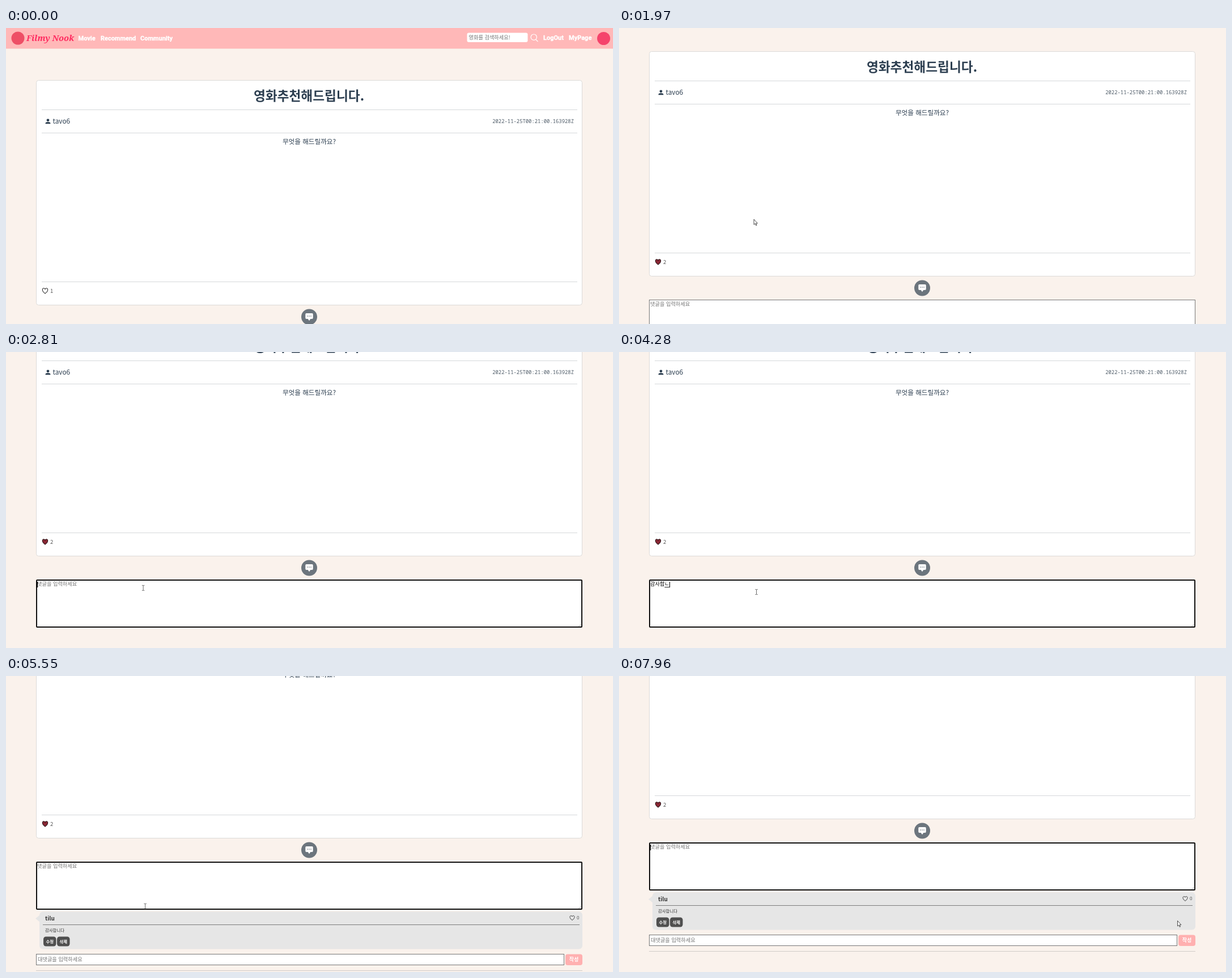
An HTML page that plays this animation: 1071 px wide and 523 px high, repeating every 8 s.

```html
<!DOCTYPE html>
<html lang="ko">
<head>
<meta charset="utf-8">
<title>영화 게시판</title>
<style>
  html, body { margin: 0; width: 100%; height: 100%; overflow: hidden; background: #faf2ec; }
  svg { display: block; width: 100vw; height: 100vh; }
  text { font-family: "Noto Sans CJK KR", "Noto Sans CJK", "Noto Sans", sans-serif; fill: #2c3e50; white-space: pre; }
  .nav text { font: 700 11px Roboto, sans-serif; fill: #fff; stroke: #fff; stroke-width: .35px; }
  .nav .brand { font: italic 700 14.6px "Noto Serif", serif; fill: #ff2a5f; stroke: none; }
  .nav .hint, .hint { font-size: 9.2px; font-weight: 400; fill: #757575; stroke: none; }
  .nav .hint { font-family: "Noto Sans CJK KR", "Noto Sans CJK", sans-serif; }
  .title { font-size: 22.7px; font-weight: 700; text-anchor: middle; }
  .date { font: 8.9px "Noto Sans Mono", monospace; fill: #4c5966; text-anchor: end; }
  .small { font-size: 9.5px; fill: #555; }
  .btn { font-weight: 700; fill: #fff; text-anchor: middle; }
  .rule { stroke: #d5d8da; }
  .outline { fill: none; stroke: #333; stroke-width: 1.1; }
  #box { x: 53.5px; y: 531.5px; width: 963px; height: 84px; fill: #fff; stroke: #767676; }
  #box.focused { x: 54px; y: 532px; width: 962px; height: 83px; rx: 1px; stroke: #101010; stroke-width: 2px; }
</style>
</head>
<body>
<svg viewBox="0 0 1071 523" preserveAspectRatio="none">
  <defs>
    <path id="heart" d="M0 4.8C-6.6 .5-5-4.4-2.5-4.4-1.2-4.4-.4-3.6 0-2.7 .4-3.6 1.2-4.4 2.5-4.4 5-4.4 6.6 .5 0 4.8Z"/>
  </defs>
  <rect width="1071" height="523" fill="#faf2ec"/>
  <g id="page">
    <g class="nav">
      <rect width="1071" height="36.5" fill="#ffb8b8"/>
      <circle cx="21" cy="18" r="11.5" fill="#ee4f66"/>
      <text class="brand" x="36" y="22.5">Filmy Nook</text>
      <text x="127.5" y="21.5">Movie</text>
      <text x="167" y="21.5">Recommend</text>
      <text x="237" y="21.5">Community</text>
      <rect x="813.5" y="8.5" width="107" height="16.5" rx="3" fill="#fff"/>
      <text class="hint" x="816.5" y="20.2">영화를 검색하세요!</text>
      <path d="M935 20.5L938.5 24M936.5 16.2a5.2 5.2 0 1 1-10.4 0a5.2 5.2 0 1 1 10.4 0" fill="none" stroke="#fff" stroke-width="1.2"/>
      <text x="948" y="20.5">LogOut</text>
      <text x="993" y="20.5">MyPage</text>
      <circle cx="1054.5" cy="18.5" r="11.5" fill="#f5436b"/>
    </g>

    <rect x="53.5" y="92.5" width="963" height="397" rx="4" fill="#fff" stroke="#dcdad8"/>
    <text class="title" x="534.5" y="127.5">영화추천해드립니다.</text>
    <path class="rule" d="M63 144.5H1008M63 185.5H1008M63 448.5H1008"/>
    <g fill="#2c3e50">
      <circle cx="74" cy="162.8" r="2.4"/>
      <path d="M69.6 169.3V168C69.6 165.3 78.4 165.3 78.4 168V169.3Z"/>
    </g>
    <text x="82.5" y="169" font-size="11.8">tavo6</text>
    <text class="date" x="1002" y="167.5">2022-11-25T00:21:00.163928Z</text>
    <text x="535" y="205.3" font-size="11.6" text-anchor="middle">무엇을 해드릴까요?</text>
    <use id="like" href="#heart" x="69" y="464.2" stroke-width="1.1"/>
    <text id="likes" class="small" x="78" y="467.7">1</text>

    <circle cx="535" cy="510.5" r="14" fill="#6c757d"/>
    <path d="M530 504H540Q541.7 504 541.7 505.7V512.3Q541.7 514 540 514H537.3L535 517.2L532.7 514H530Q528.3 514 528.3 512.3V505.7Q528.3 504 530 504Z" fill="#fff"/>
    <path d="M532 509H532.01M535 509H535.01M538 509H538.01" stroke="#6c757d" stroke-width="1.7" stroke-linecap="round"/>

    <rect id="box"/>
    <path d="M1010.5 614L1015.5 609M1013.5 614L1015.5 612" stroke="#888" stroke-width=".7"/>
    <text id="hint" class="hint" x="55" y="542.4">댓글을 입력하세요</text>
    <text id="typed" x="55" y="542.4" font-size="9.2" style="fill:#000"></text>
    <path id="compose" stroke="#222"/>
    <path id="caret" stroke="#000"/>

    <g id="reply">
      <path d="M59.5 625.5L52 631.5L59.5 637.5Z" fill="#e6e6e6"/>
      <rect x="59" y="619.5" width="958" height="66" rx="6" fill="#e6e6e6"/>
      <text x="69" y="635.3" font-size="10" font-weight="700" style="fill:#333">tilu</text>
      <use href="#heart" class="outline" transform="translate(999 630.3) scale(.86)"/>
      <text x="1007" y="633" font-size="8" style="fill:#555">0</text>
      <path d="M65 642.5H1012" stroke="#7c7c7c"/>
      <text x="69" y="655" font-size="7.4" style="fill:#333">감사합니다</text>
      <rect x="66" y="663.5" width="22.5" height="17" rx="4.5" fill="#4f4f4f"/>
      <rect x="90" y="663.5" width="22.5" height="17" rx="4.5" fill="#4f4f4f"/>
      <text class="btn" x="77.2" y="674.6" font-size="7.4">수정</text>
      <text class="btn" x="101.2" y="674.6" font-size="7.4">삭제</text>
      <rect x="53.5" y="694.5" width="931" height="19" fill="#fff" stroke="#767676"/>
      <text class="hint" x="56" y="707.2">대댓글을 입력하세요</text>
      <rect x="987" y="694.5" width="30" height="19.5" rx="4" fill="#ffb0b0"/>
      <text class="btn" x="1002" y="707.3" font-size="9">작성</text>
      <path d="M53 723.5H1017" stroke="#d0cbc8"/>
    </g>
  </g>

  <g id="cursor" fill="#fff" stroke="#222" stroke-width=".8">
    <path data-kind="arrow" d="M0 0V9.4L2.2 7.5L3.7 10.9L5.1 10.3L3.7 7.1H6.4Z"/>
    <path data-kind="beam" fill="none" stroke="#444" d="M-2.2-4.5H-.6L0-4L.6-4.5H2.2M0-4V4M-2.2 4.5H-.6L0 4L.6 4.5H2.2"/>
    <path data-kind="hand" d="M-1 0Q0-1 1 0V4.5L5 5.4Q6 5.8 5.8 7L5 11.5H-1L-4 7.5Q-4 6-2.6 6.4L-1 7.5Z"/>
  </g>
</svg>
<script>
const LOOP = 8000;
const $ = id => document.getElementById(id);
const show = (el, on) => el.setAttribute("visibility", on ? "visible" : "hidden");

// Rows: time, value(s)
const scrollPath = [[1880, 0], [1950, 35], [2010, 80], [2070, 115], [2130, 115], [2140, 129],
  [5390, 129], [5420, 136], [5465, 136], [5500, 165], [5560, 210], [5640, 237]];
const mousePath = [[100, 876, 179], [400, 480, 330], [700, 25, 430], [840, 31, 400],
  [920, 36, 408], [1190, 67.5, 470], [1710, 67.5, 470], [1900, 238, 338], [2380, 238, 338],
  [2850, 242.5, 424], [5260, 242.5, 424], [5400, 245, 409.5], [5640, 246, 405],
  [5980, 841, 446], [6100, 841, 446], [6520, 456, 435], [6870, 79, 437],
  [7340, 79, 437], [7960, 985.5, 432.5]];
const typing = "ㄱ 가 감 감ㅅ 감사 감샇 감사하 감사합 감사합ㄴ 감사합니 감사합닏 감사합니다".split(" ");

const TYPE_START = 3690, TYPE_STEP = 71.8, SENT = 4700, POSTED = 4750;
const LIKED = 1410, FOCUSED = 2700;

function at(path, t) {
  const i = path.findIndex(row => row[0] > t);
  if (i < 0) return path[path.length - 1].slice(1);
  if (i === 0) return path[0].slice(1);
  const a = path[i - 1], b = path[i], k = (t - a[0]) / (b[0] - a[0]);
  return a.slice(1).map((v, j) => v + (b[j + 1] - v) * k);
}

function typedText(t) {
  if (t < TYPE_START || t >= SENT) return "";
  return typing[Math.min(typing.length - 1, Math.floor((t - TYPE_START) / TYPE_STEP))];
}

function caretOn(t) {
  if (t < FOCUSED) return false;
  if (t >= TYPE_START && t < POSTED) return true;
  return Math.floor((t - (t < TYPE_START ? FOCUSED : POSTED)) / 500) % 2 === 0;
}

function cursorKind(x, y, scroll) {
  const py = y + scroll;
  if (x > 53 && x < 1017 && py > 531 && py < 616 && scroll > 0) return "beam";
  if (x > 66 && x < 88 && py > 663 && py < 681) return "hand";
  return "arrow";
}

function drawLike(t) {
  const liked = t >= LIKED;
  $("like").setAttribute("fill", !liked ? "none" : t < 1900 ? "#e3141c" : "#8a2734");
  $("like").setAttribute("stroke", liked ? "#2b1418" : "#333");
  $("likes").textContent = liked ? "2" : "1";
}

function drawEditor(t) {
  const text = typedText(t);
  $("box").classList.toggle("focused", t >= FOCUSED);
  $("typed").textContent = text;
  show($("hint"), !text);
  show($("compose"), text);
  show($("caret"), caretOn(t));
  const end = 55 + (text ? $("typed").getComputedTextLength() : 0);
  $("compose").setAttribute("d", `M${end - 8.4} 544.5H${end}`);
  $("caret").setAttribute("d", `M${Math.round(end) + .5} 535V545`);
}

function drawCursor(t, scroll) {
  const [x, y] = at(mousePath, t), kind = cursorKind(x, y, scroll);
  $("cursor").setAttribute("transform", `translate(${x} ${y})`);
  for (const shape of $("cursor").children) show(shape, t >= 100 && shape.dataset.kind === kind);
}

const start = performance.now();
function frame() {
  const t = (performance.now() - start) % LOOP;
  const [scroll] = at(scrollPath, t);
  $("page").setAttribute("transform", `translate(0 ${-Math.round(scroll)})`);
  drawLike(t);
  drawEditor(t);
  show($("reply"), t >= POSTED);
  drawCursor(t, scroll);
  requestAnimationFrame(frame);
}
frame();
</script>
</body>
</html>
```
